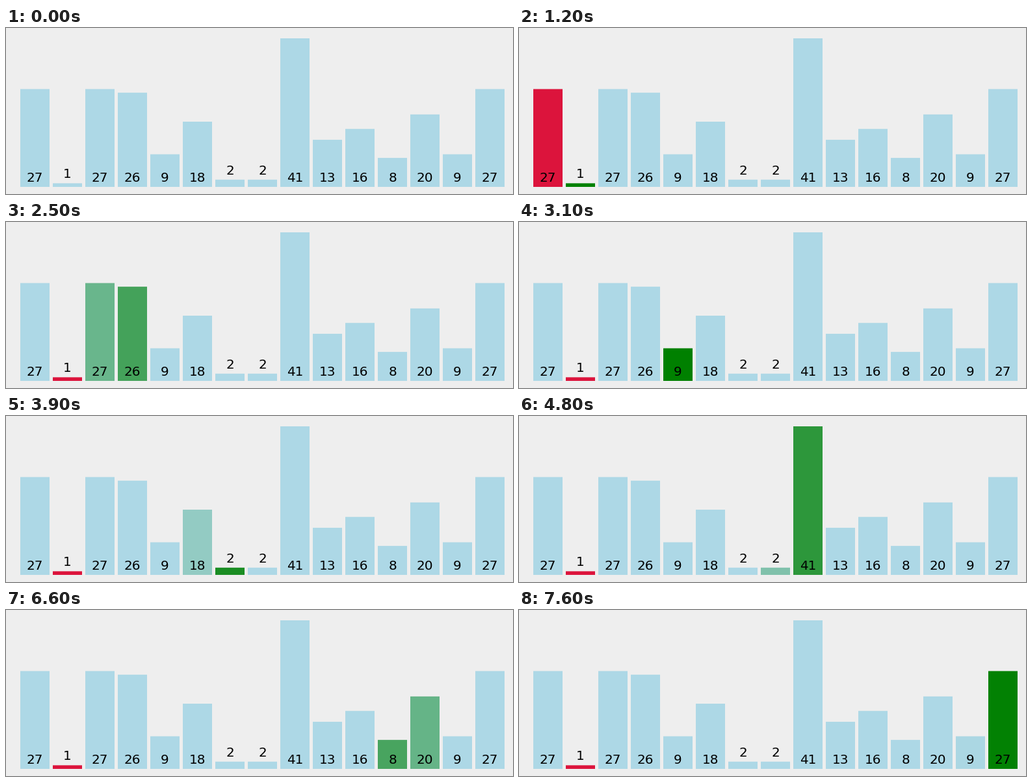
A matplotlib script that plays this animation: 780x257 px, repeating every 8 s.

```python
import matplotlib.pyplot as plt
import numpy as np
from matplotlib.animation import FuncAnimation
from matplotlib.colors import to_rgb
from matplotlib.patches import Rectangle

W, H, DPI = 780, 257, 64
FRAME_MS, FRAMES = 100, 80

VALUES = [27, 1, 27, 26, 9, 18, 2, 2, 41, 13, 16, 8, 20, 9, 27]
BAR_W, PITCH, LEFT, BASE = 45, 50, 22, 246
UNIT = 230 / max(VALUES)

FONT_PX = 20
DIGIT_W = 0.636 * FONT_PX
LABEL_GAP = 8

IDLE, LOWEST, PROBE = (np.array(to_rgb(c)) for c in ("lightblue", "crimson", "green"))

# Selection sort's first pass: recolour steps start at a steady pace.
STEP_START, STEP_MS, FADE_MS = 549.5, 457.3, 225
STEPS = [{0: LOWEST}, {1: PROBE}, {0: IDLE, 1: LOWEST}, {2: PROBE}]
STEPS += [{i - 1: IDLE, i: PROBE} for i in range(3, len(VALUES))]


def fade(t):
    """Cubic ease in and out, with the faint beginning left out."""
    t = min(t, 1)
    if t < 0.282:
        return 0
    return 4 * t**3 if t < 0.5 else 1 - 4 * (1 - t) ** 3


def bar_colors(ms):
    colors = [IDLE] * len(VALUES)
    for k, changes in enumerate(STEPS):
        p = fade((ms - STEP_START - k * STEP_MS) / FADE_MS)
        for i, goal in changes.items():
            colors[i] = colors[i] + (goal - colors[i]) * p
    return colors


def add_bar(ax, i, value):
    x, h = LEFT + i * PITCH, value * UNIT
    bar = Rectangle((x, BASE - h), BAR_W, h, lw=0, fc=IDLE, snap=False)
    ax.add_patch(bar)
    text = str(value)
    floor = BASE if h > 24 else BASE - h
    ax.text(x + BAR_W / 2 - len(text) * DIGIT_W / 2, floor - LABEL_GAP, text,
            family="DejaVu Sans", size=FONT_PX * 72 / DPI, color="black",
            ha="left", va="baseline")
    return bar


fig = plt.figure(figsize=(W / DPI, H / DPI), dpi=DPI, facecolor="#eeeeee")
ax = fig.add_axes([0, 0, 1, 1])
ax.set(xlim=(0, W), ylim=(H, 0))
ax.axis("off")
bars = [add_bar(ax, i, v) for i, v in enumerate(VALUES)]


def draw(frame):
    for bar, color in zip(bars, bar_colors(frame * FRAME_MS)):
        bar.set_facecolor(np.clip(color, 0, 1))
    return bars


anim = FuncAnimation(fig, draw, frames=FRAMES, interval=FRAME_MS,
                     repeat=True, repeat_delay=0)
plt.show()
```
